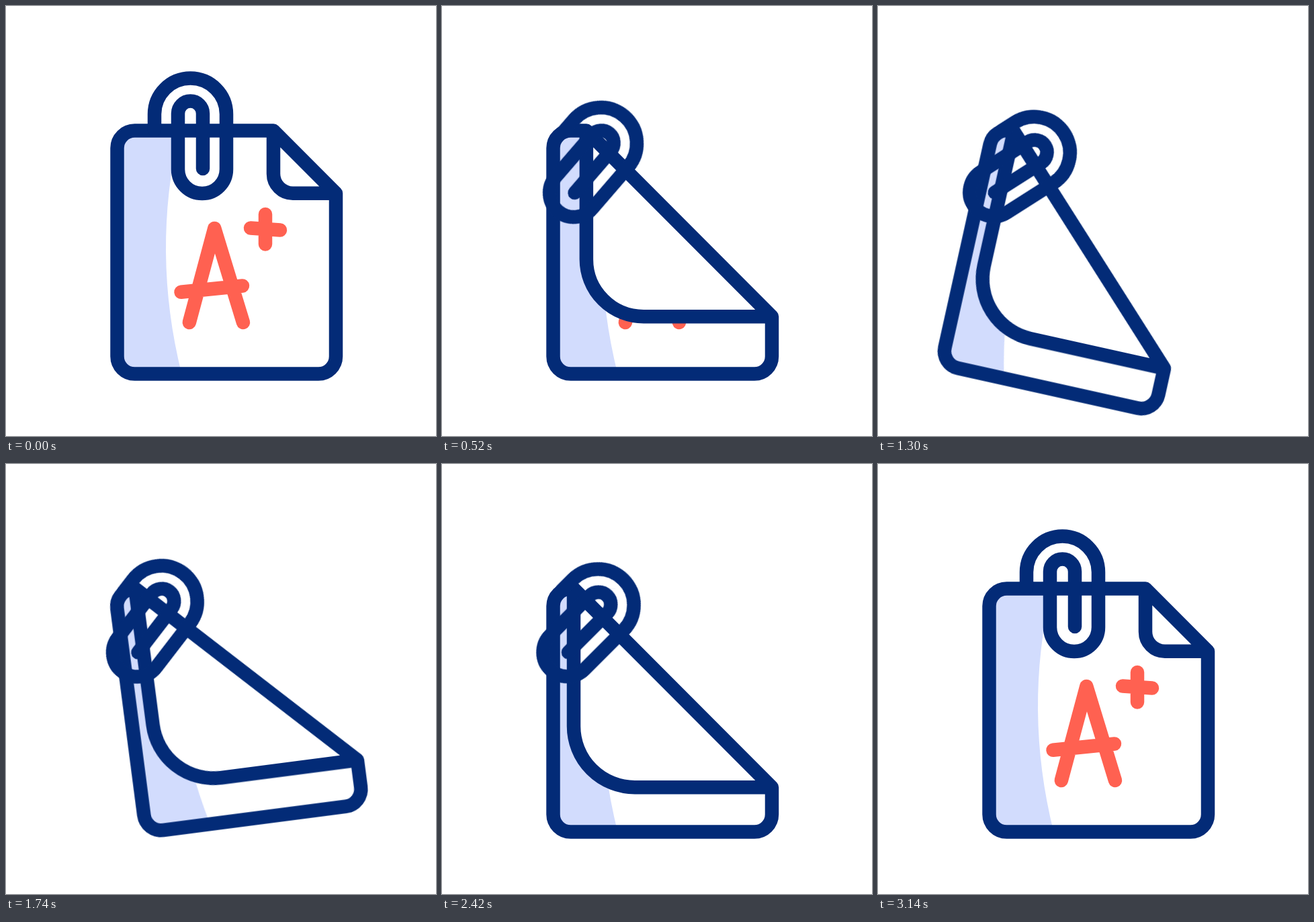
An HTML page without scripts for the animation above (3360 ms loop, 640x640 px).

```html
<!DOCTYPE html>
<html lang="en">
<head>
<meta charset="utf-8">
<title>Graded paper</title>
<style>
  :root { --loop: 3360ms; --ease: cubic-bezier(.364, 0, .636, 1); }
  html, body { margin: 0; width: 100%; height: 100%; overflow: hidden; background: #fff; }
  svg { display: block; width: 100vw; height: 100vh; }

  .line, .grade { fill: none; stroke-width: 20.5; stroke-linecap: round; stroke-linejoin: round; }
  .line { stroke: #032b77; }
  .grade { stroke: #ff6151; }
  .shade { fill: #d2dcfd; }
  .flap { fill: #fff; }

  .sheet, .clip, .edge, .flap { animation: var(--loop) var(--ease) infinite; }
  .sheet { transform-origin: 193.5px 214.5px; animation-name: swing; }
  .clip { transform-origin: 274.5px 193px; animation-name: slide; }
  .edge { animation-name: edge; }
  .flap { animation-name: flap; }

  /* pendulum swing that dies away */
  @keyframes swing {
    0%, 17.857% { transform: rotate(0deg); }
    35.714% { transform: rotate(16deg); }
    48.6% { transform: rotate(-11deg); }
    58.51% { transform: rotate(4.1deg); }
    71.9%, 100% { transform: rotate(0deg); }
  }

  @keyframes slide {
    0%, 5.952%, 93.25%, 100% { transform: translate(0px, 0px) rotate(0deg); }
    17.857%, 80.357% { transform: translate(-65px, 39.5px) rotate(45deg); }
  }

  /* the corner folds down and back */
  @keyframes edge {
    0%, 5.952%, 93.25%, 100% {
      d: path("M398 185.6H191.5A26 26 0 0 0 165.5 211.6V521.5A26 26 0 0 0 191.5 547.5H465A26 26 0 0 0 491 521.5V278.7L398 185.6V249.7A29 29 0 0 0 427 278.7H491");
    }
    17.857%, 80.357% {
      d: path("M196 185.6H191.5A26 26 0 0 0 165.5 211.6V521.5A26 26 0 0 0 191.5 547.5H465A26 26 0 0 0 491 521.5V481.2L196 185.6V390.2A91 91 0 0 0 287 481.2H491");
    }
  }

  @keyframes flap {
    0%, 5.952%, 93.25%, 100% {
      d: path("M398 185.6V249.7A29 29 0 0 0 427 278.7H491V185.6Z");
    }
    17.857%, 80.357% {
      d: path("M196 185.6V390.2A91 91 0 0 0 287 481.2H491V185.6Z");
    }
  }
</style>
</head>
<body>
<svg viewBox="0 0 640 640">
  <g class="sheet">
    <path class="shade" d="M191.5 185.6H258.3Q216.2 366.5 261.4 547.5H191.5A26 26 0 0 1 165.5 521.5V211.6A26 26 0 0 1 191.5 185.6Z"/>
    <path class="grade" d="M272.8 471L310.3 331L353 471M260.5 425.8L352 416.5M386 310V354.5M364 330.5L408 333.5"/>
    <path class="flap" d="M398 185.6V249.7A29 29 0 0 0 427 278.7H491V185.6Z"/>
    <path class="line edge" d="M398 185.6H191.5A26 26 0 0 0 165.5 211.6V521.5A26 26 0 0 0 191.5 547.5H465A26 26 0 0 0 491 521.5V278.7L398 185.6V249.7A29 29 0 0 0 427 278.7H491"/>
    <path class="line clip" d="M221 184V161A53.5 53.5 0 0 1 328 161V243A36 36 0 0 1 256 243V160A18.5 18.5 0 0 1 293 160V242"/>
  </g>
</svg>
</body>
</html>
```
